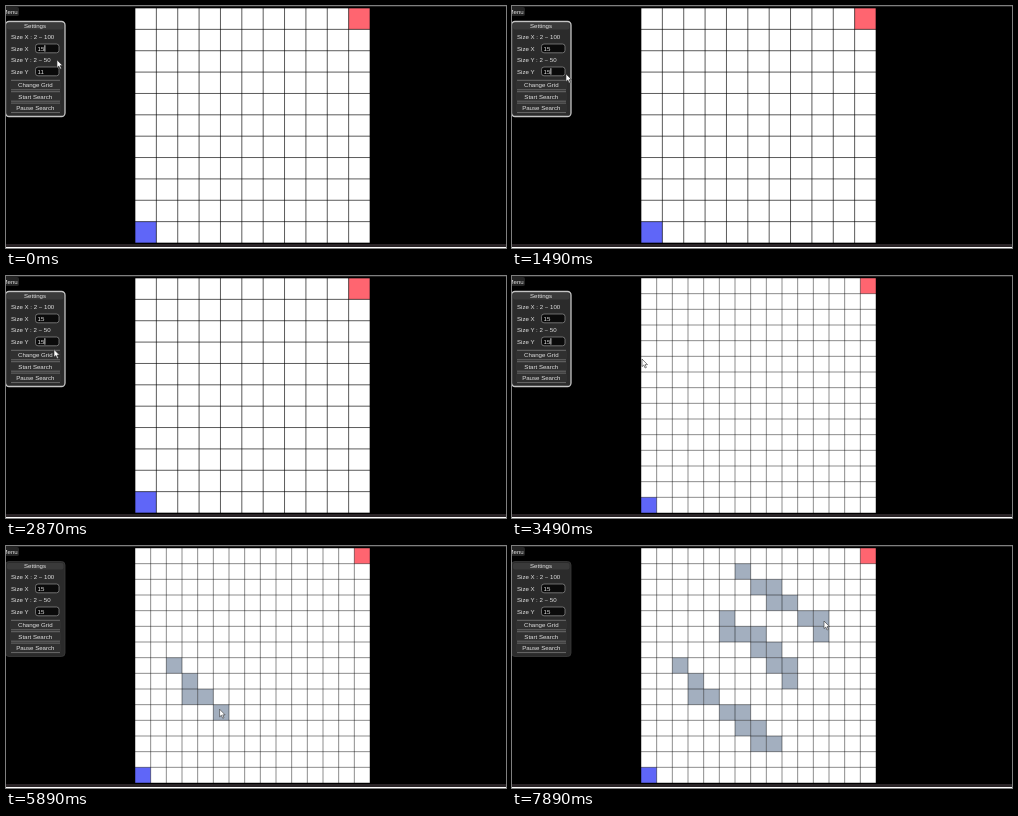
Animation, 500 px wide and 242 px high, one loop 8000 ms. Source, as an HTML page:

```html
<!DOCTYPE html>
<html lang="en">
<head>
<meta charset="utf-8">
<title>Grid path search</title>
<style>
  html, body { margin: 0; width: 100%; height: 100%; overflow: hidden; background: #000; }
  svg { display: block; width: 100%; height: 100%; }
  text { font: 6.1px "Liberation Sans", Arial, sans-serif; fill: #e2e2e2; }
  .mid { text-anchor: middle; }
  .field { fill: #0a0a0a; stroke: #858585; stroke-width: .8; }
  .button { fill: #303030; }
  .edge { stroke: #858585; stroke-width: .7; }
</style>
</head>
<body>
<svg viewBox="0 0 500 242" preserveAspectRatio="none">
  <rect width="500" height="242"/>
  <rect width="500" height="1" fill="#242424"/>
  <rect y="238" width="500" height="3" fill="#2a2427"/>
  <rect y="241" width="500" height="1" fill="#fff"/>

  <rect x="-5" y="1" width="18" height="9" rx="2" fill="#242424"/>
  <text x="-3.5" y="8.1">Menu</text>

  <g id="panel">
    <rect id="frame" x="-.5" y="15.5" width="59.5" height="95" rx="3.5" fill="#2b2b2b"/>
    <rect x="1" y="17" width="56.5" height="6.5" rx="2" fill="#3a3a3a"/>
    <text class="mid" x="29" y="22">Settings</text>
    <text x="5" y="33">Size X : 2 ~ 100</text>
    <text x="5" y="44.6">Size X</text>
    <text x="5" y="56">Size Y : 2 ~ 50</text>
    <text x="5" y="67.6">Size Y</text>
    <rect class="field" x="29.5" y="38" width="23.5" height="8.8" rx="2.5"/>
    <rect class="field" x="29.5" y="61" width="23.5" height="8.8" rx="2.5"/>
    <text x="31.5" y="44.6">15</text>
    <text id="sizeY" x="31.5" y="67.6">11</text>
    <rect id="caret" width=".8" height="6.4" fill="#fff"/>
  </g>

  <g id="board">
    <rect id="paper" fill="#fff"/>
    <g id="walls" fill="#a3afbf"></g>
    <rect id="start" fill="#5f66f8"/>
    <rect id="goal" fill="#ff6570"/>
    <path id="lines" fill="none" stroke="#000" stroke-width=".9"/>
  </g>

  <path id="cursor" d="M0 0V7.6L1.8 6L3.1 9L4.4 8.4L3.1 5.6H5.5Z" fill="#fff" stroke="#333" stroke-width=".6"/>
</svg>
<script>
const LOOP = 8000, BEAT = 200, FIRST_BEAT = 70;
const LEFT = 129, TOP = 2, BOARD = 235, UNIT = BOARD / 15;
const EDIT_Y = 4, TYPE_1 = 5, TYPE_5 = 7, RESIZE = 16, BLUR = 28;
const $ = id => document.getElementById(id);

function set(node, attrs) {
  for (const key in attrs) node.setAttribute(key, attrs[key]);
}
function add(parent, tag, attrs, label = '') {
  const node = document.createElementNS('http://www.w3.org/2000/svg', tag);
  set(node, attrs);
  node.textContent = label;
  return parent.appendChild(node);
}
function square(node, col, row, size) {
  set(node, { x: col * size, y: row * size, width: size, height: size });
}
const show = (node, on) => set(node, { visibility: on ? 'visible' : 'hidden' });
const mix = (a, b, k) => a + (b - a) * k;

['Change Grid', 'Start Search', 'Pause Search'].forEach((label, i) => {
  const y = 74.3 + i * 11.4;
  add($('panel'), 'rect', { class: 'button', x: 4, y, width: 51, height: 9.5, rx: 2 });
  add($('panel'), 'path', { class: 'edge', d: `M5 ${y}h49m0 9.5h-49` });
  add($('panel'), 'text', { class: 'mid', x: 29.3, y: y + 6.9 }, label);
});
set($('board'), { transform: `translate(${LEFT} ${TOP})` });
square($('paper'), 0, 0, BOARD);

// Pointer route in beats; "hover" and "drag" take grid coordinates
const move = (beat, x, y) => ({ beat, x, y });
const hover = (beat, col, row) => move(beat, LEFT + col * UNIT, TOP + row * UNIT);
const drag = (...at) => ({ ...hover(...at), pen: true });
const route = [
  move(0, 51, 54), move(8, 54, 68), move(14, 50, 69), move(RESIZE, 46, 78),
  move(18, 130, 83), move(24, 98.6, 127),
  hover(BLUR, 2.4, 7.16), drag(29, 3.8, 9.12), drag(32, 8.6, 12.64),
  hover(35, 5.74, 4.03),
  hover(35.2, 5.5, 4.65), drag(37, 9.7, 8.3),
  hover(38, 6.4, 1.6), drag(39.8, 11.8, 5.2),
  move(40, 312, 75)
];

function pointerAt(beat) {
  const next = route.findIndex(stop => stop.beat > beat);
  if (next < 0) return route[route.length - 1];
  const a = route[next - 1], b = route[next];
  const k = (beat - a.beat) / (b.beat - a.beat);
  return { x: mix(a.x, b.x, k), y: mix(a.y, b.y, k) };
}

// Every cell that a drag crosses becomes a wall from that beat on
const walls = new Map();
route.forEach((stop, i) => {
  const from = route[i - 1], steps = 58;
  for (let s = 0; stop.pen && s <= steps; s++) {
    const k = s / steps;
    const col = Math.floor((mix(from.x, stop.x, k) - LEFT) / UNIT);
    const row = Math.floor((mix(from.y, stop.y, k) - TOP) / UNIT);
    const key = `${col},${row}`;
    if (walls.has(key)) continue;
    const node = add($('walls'), 'rect', {});
    square(node, col, row, UNIT);
    walls.set(key, { node, beat: mix(from.beat, stop.beat, k) });
  }
});

function drawBoard(count, opacity) {
  const size = BOARD / count;
  let d = '';
  for (let i = 0; i <= count; i++) d += `M${i * size} 0V${BOARD}M0 ${i * size}H${BOARD}`;
  set($('lines'), { d, 'stroke-opacity': opacity });
  square($('start'), 0, count - 1, size);
  square($('goal'), count - 1, 0, size);
}

function render(time) {
  const beat = Math.floor((time - FIRST_BEAT) / BEAT) + 1;
  const { x, y } = pointerAt(beat);
  const focused = beat < BLUR;
  const value = beat < TYPE_1 ? '11' : beat < TYPE_5 ? '1' : '15';

  set($('cursor'), { transform: `translate(${x} ${y})` });
  set($('frame'), { stroke: focused ? '#c4c4c4' : '#3c3c3c', 'stroke-width': focused ? 1.3 : .8 });
  $('sizeY').textContent = value;
  set($('caret'), { x: 31.7 + value.length * 3.4, y: beat < EDIT_Y ? 39.2 : 62.2 });
  show($('caret'), focused);
  if (beat < RESIZE) drawBoard(11, .72);
  else drawBoard(15, .5);
  for (const wall of walls.values()) show(wall.node, beat >= wall.beat);
}

const began = performance.now();
function loop() {
  render((performance.now() - began) % LOOP);
  requestAnimationFrame(loop);
}
loop();
</script>
</body>
</html>
```
